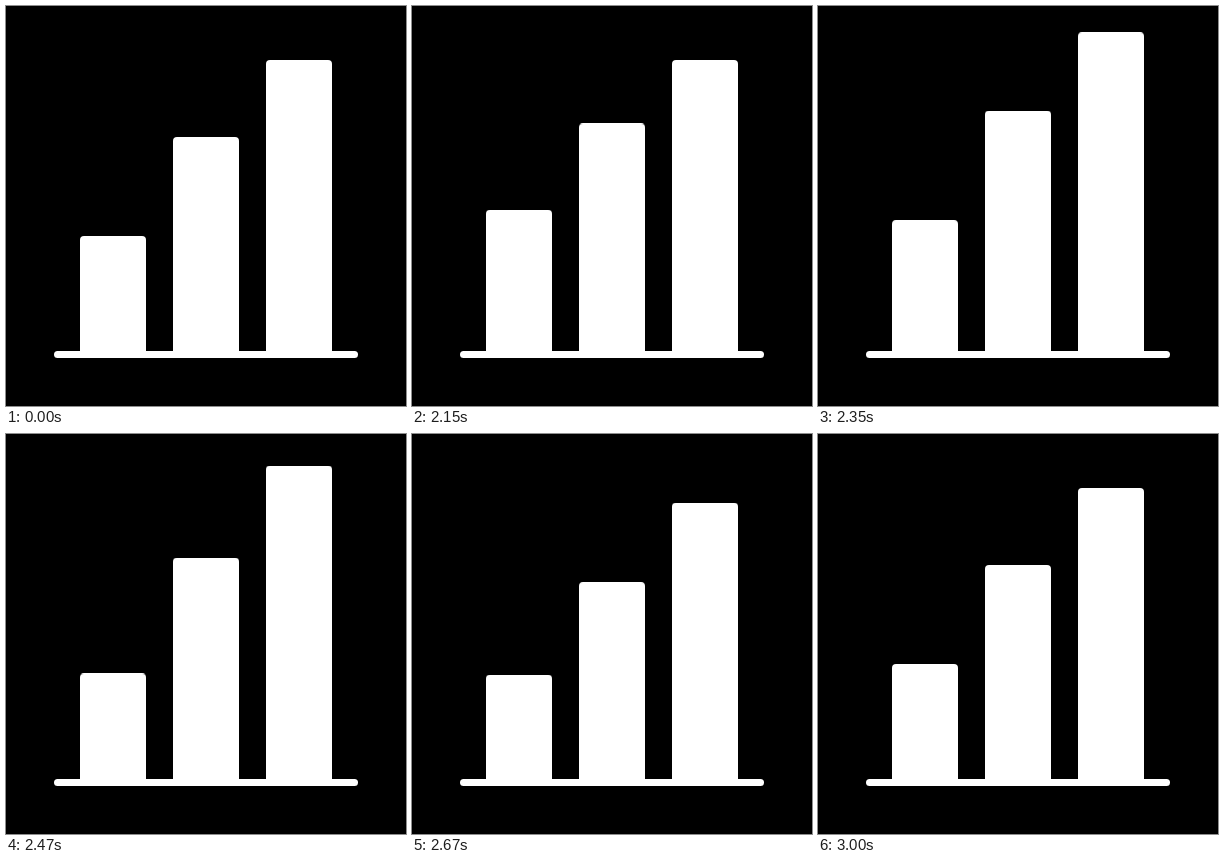
These frames come from a looping animation (400 px wide and 400 px high, 3.02 s). An HTML page:

```html
<!DOCTYPE html>
<html lang="en">
<head>
<meta charset="utf-8">
<title>Bar chart</title>
<style>
  html, body {
    margin: 0;
    width: 100%;
    height: 100%;
    overflow: hidden;
    background: #000;
  }
  svg { display: block; fill: #fff; }
  .bar { animation: bounce 3020ms var(--delay) infinite; }

  /* still for about two seconds, then up, below rest and back */
  @keyframes bounce {
    0% { transform: translateY(0); animation-timing-function: linear; }
    66.13% { transform: translateY(0); animation-timing-function: cubic-bezier(.4, 0, .16, 1); }
    73.58% { transform: translateY(-28px); animation-timing-function: cubic-bezier(.45, 0, .57, 1); }
    85.17% { transform: translateY(17.4px); animation-timing-function: cubic-bezier(.3, 0, .55, 1); }
    93.94%, 100% { transform: translateY(0); }
  }
</style>
</head>
<body>
<svg width="400" height="400" viewBox="0 0 400 400">
  <!-- the inner viewport hides the bars below the base line -->
  <svg width="400" height="348" overflow="hidden">
    <rect class="bar" style="--delay: 0ms" x="74" y="230" width="66" height="200" rx="4"/>
    <rect class="bar" style="--delay: 80ms" x="167" y="131" width="66" height="300" rx="4"/>
    <rect class="bar" style="--delay: 160ms" x="260" y="54" width="66" height="380" rx="4"/>
  </svg>
  <rect x="48" y="345" width="304" height="7" rx="3.5"/>
</svg>
</body>
</html>
```
